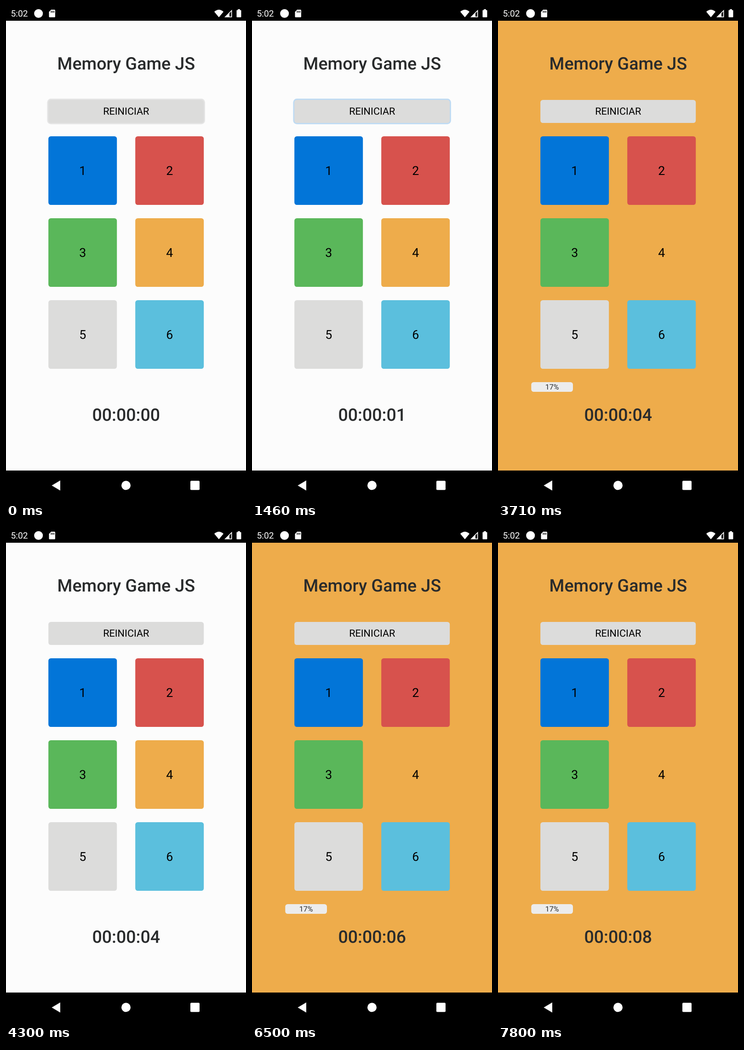
An HTML page for the animation above (8 s loop, 522x1073 px).

```html
<!DOCTYPE html>
<html lang="es">
<head>
<meta charset="utf-8">
<title>Memory Game</title>
<style>
  html, body { margin: 0; width: 100%; height: 100%; overflow: hidden; background: #000; }
  svg { display: block; width: 522px; height: 1073px; }
  text { font-family: Roboto, Arial, sans-serif; text-anchor: middle; text-rendering: geometricPrecision; }
  .head { font-size: 37.5px; font-weight: 500; fill: #292b2c; }
  .num { font-size: 26.8px; }
  .light { fill: #fff; }

  #page { fill: #fcfcfc; }
  #bar, .ring, .press { opacity: 0; }
  .ring { fill: #0275d8; }

  .run #page { animation: flash 8s step-end infinite; }
  .run #bar { animation: bar 8s step-end infinite; }
  .run #resetRing { animation: reset 8s step-end infinite; }
  .run #ring5 { animation: tap5 8s step-end infinite; }
  .run #press2 { animation: tap2 8s step-end infinite; }
  .run #press1 { animation: tap1 8s step-end infinite; }

  @keyframes flash {
    0%, 49.5%, 83.875% { fill: #fcfcfc; }
    38.625%, 71.375%, 97.5%, 100% { fill: #eeac4b; }
  }
  @keyframes bar {
    0%, 49.5%, 83.875% { opacity: 0; }
    38.625%, 71.375%, 97.5%, 100% { opacity: 1; }
  }
  @keyframes reset {
    0% { opacity: 1; fill: #e4e4e4; }
    4.75% { opacity: .25; fill: #0275d8; }
    32.375%, 100% { opacity: 0; }
  }
  @keyframes tap5 {
    0%, 38.625%, 100% { opacity: 0; }
    32.375% { opacity: .25; }
  }
  @keyframes tap2 {
    0%, 71.375%, 100% { opacity: 0; }
    65.125% { opacity: 1; }
  }
  @keyframes tap1 {
    0%, 97.5%, 100% { opacity: 0; }
    86.5% { opacity: 1; }
  }
</style>
</head>
<body>
<svg viewBox="0 0 522 1073">
  <defs>
    <rect id="key" width="149" height="149" rx="5.4"/>
    <rect id="halo" x="-2.7" y="-2.7" width="154.4" height="154.4" rx="8"/>
  </defs>
  <rect width="522" height="1073"/>
  <rect id="page" y="32" width="522" height="977"/>

  <!-- status bar -->
  <g fill="#fff">
    <text x="29" y="23" font-size="19.2">5:02</text>
    <circle cx="70.7" cy="16.3" r="9.5"/>
    <path d="M98 8h7.5q1.5 0 1.5 1.5v13.500q0 1.500-1.500 1.500H95q-1.500 0-1.500-1.500V13z"/>
    <path d="M98.300 10.500v4M101.300 10.500v4M104.300 10.500v4" stroke="#000" stroke-width="1.500"/>
    <path d="M453 12.500Q463 3.500 473 12.500L463 24.500z"/>
    <path d="M475 24.500L491.500 8v16.500zM486 15.800V22.800H489.800V12z" fill-rule="evenodd"/>
    <path d="M504 7h5v2h1.500q1 0 1 1v13.500q0 1-1 1h-8q-1 0-1-1V10q0-1 1-1H504z"/>
  </g>

  <text class="head" x="261.300" y="137.700">Memory Game JS</text>

  <rect id="resetRing" class="ring" x="89.500" y="201.300" width="343.400" height="55.400" rx="8"/>
  <rect x="92.200" y="204" width="338" height="50" rx="5.400" fill="#dcdcdb"/>
  <text x="261.300" y="236.300" font-size="21.600">REINICIAR</text>

  <g transform="translate(92.200 283)">
    <use href="#key" fill="#0275d8"/>
    <text class="num" x="74.500" y="83.700">1</text>
    <g id="press1" class="press">
      <use href="#halo" fill="#81b9ea"/>
      <use href="#key" fill="#025aa5"/>
      <text class="num light" x="74.500" y="83.700">1</text>
    </g>
  </g>
  <g transform="translate(281.200 283)">
    <use href="#key" fill="#d7524d"/>
    <text class="num" x="74.500" y="83.700">2</text>
    <g id="press2" class="press">
      <use href="#halo" fill="#eaa8a6"/>
      <use href="#key" fill="#c72f2b"/>
      <text class="num light" x="74.500" y="83.700">2</text>
    </g>
  </g>
  <g transform="translate(92.200 461)">
    <use href="#key" fill="#5ab75a"/>
    <text class="num" x="74.500" y="83.700">3</text>
  </g>
  <g transform="translate(281.200 461)">
    <use href="#key" fill="#eeac4b"/>
    <text class="num" x="74.500" y="83.700">4</text>
  </g>
  <g transform="translate(92.200 639)">
    <use id="ring5" class="ring" href="#halo"/>
    <use href="#key" fill="#dcdcdb"/>
    <text class="num" x="74.500" y="83.700">5</text>
  </g>
  <g transform="translate(281.200 639)">
    <use href="#key" fill="#5bbfdd"/>
    <text class="num" x="74.500" y="83.700">6</text>
  </g>

  <g id="bar">
    <rect x="72.300" y="817" width="90.700" height="21" rx="5.400" fill="#ececec"/>
    <text x="117.700" y="832.500" font-size="16" fill="#292b2c">17%</text>
  </g>

  <text id="clock" class="head" x="261.300" y="900.500">00:00:00</text>

  <!-- navigation bar -->
  <g fill="#fff">
    <path d="M99.500 1041.500L118 1030.500V1052.500z"/>
    <circle cx="261" cy="1041.300" r="10"/>
    <rect x="401" y="1031.300" width="20" height="20" rx="2"/>
  </g>
</svg>
<script>
  const LOOP = 8000, LEAD = 300; // the clock already ran 300 ms when the loop begins
  const clock = document.getElementById('clock');
  let start, shown = 0;

  function frame(now) {
    if (start === undefined) {
      start = now;
      document.body.className = 'run';
    }
    const secs = Math.floor(((now - start) % LOOP + LEAD) / 1000);
    if (secs !== shown) {
      shown = secs;
      clock.textContent = '00:00:' + String(secs).padStart(2, '0');
    }
    requestAnimationFrame(frame);
  }
  requestAnimationFrame(frame);
</script>
</body>
</html>
```
